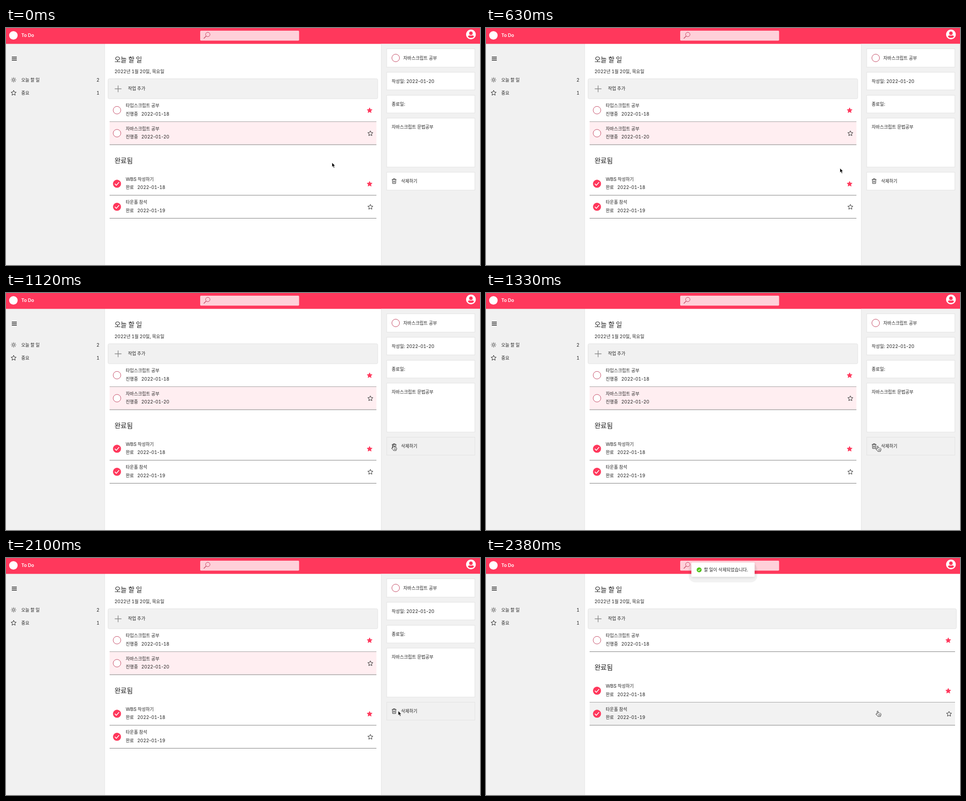
These frames come from a looping animation (1057x530 px, 3710 ms). An HTML page:

```html
<!DOCTYPE html>
<html lang="ko">
<head>
<meta charset="utf-8">
<title>To Do</title>
<style>
html, body { margin: 0; width: 100%; height: 100%; overflow: hidden; background: #fff; }
svg { display: block; width: 1057px; height: 530px; }
text {
  font-family: Inter, "Noto Sans CJK KR", "Noto Sans CJK", sans-serif;
  word-spacing: -.05em;
  fill: #222;
  white-space: pre;
}
.digits { font-variant-numeric: tabular-nums; }
</style>
</head>
<body>
<svg id="stage" viewBox="0 0 1057 530"></svg>
<script>
const PINK = '#ff385c', GREY = '#f1f1f1', EDGE = '#e2e2e2', RED = '#c23f5c';
const LOOP = 3710, STEP = 70;

// Hangul and digits are set slightly smaller than Latin; y is the middle of the line
const text = (x, y, str, size = 10.5, attrs = '') =>
  `<text x="${x}" y="${y + size * .36}" font-size="${size}" ${attrs}>` +
  str.replace(/([가-힣]+)|\d+/g, (run, hangul) => hangul
    ? `<tspan font-size="${size * .94}">${run}</tspan>`
    : `<tspan font-size="${size * .97}" class="digits">${run}</tspan>`) + '</text>';

const heading = (x, y, str) => text(x, y, str, 15.75, 'font-weight="500"');

const rect = (x, y, w, h, fill, attrs = '') =>
  `<rect x="${x}" y="${y}" width="${w}" height="${h}" fill="${fill}" ${attrs}/>`;

const circle = (x, y, r, fill, stroke = 'none') =>
  `<circle cx="${x}" cy="${y}" r="${r}" fill="${fill}" stroke="${stroke}"/>`;

const line = (d, stroke, width = 1) =>
  `<path d="${d}" fill="none" stroke="${stroke}" stroke-width="${width}"/>`;

function star(x, y, filled) {
  const points = Array.from({ length: 10 }, (_, i) => {
    const a = i * Math.PI / 5, r = i % 2 ? 2.8 : 6;
    return [x + r * Math.sin(a), y + .4 - r * Math.cos(a)].map(v => v.toFixed(2));
  });
  return `<polygon points="${points.join(' ')}" fill="${filled ? PINK : 'none'}"
    stroke="${filled ? PINK : '#222'}" stroke-linejoin="round"/>`;
}

const check = (x, y, s, width) =>
  line(`M${x - 5 * s} ${y}l${3.5 * s} ${3.7 * s} ${6.5 * s} ${-7.4 * s}`, '#fff', width);

const plus = (x, y) => line(`M${x - 7.5} ${y}h15M${x} ${y - 7.5}v15`, '#888', 1.4);

function sun(x, y) {
  let rays = '';
  for (let i = 0; i < 8; i++) {
    const c = Math.cos(i * Math.PI / 4), s = Math.sin(i * Math.PI / 4);
    rays += `M${x + 4.2 * c} ${y + 4.2 * s}L${x + 5.7 * c} ${y + 5.7 * s}`;
  }
  return circle(x, y, 2.5, 'none', '#222') + line(rays, '#222', 1.1);
}

const trash = (x, y) =>
  line(`M${x - 5} ${y - 3.5}h10M${x - 2} ${y - 3.5}v-1.6h4v1.6M${x - 3.8} ${y - 3.5}l.4 9h6.8l.4-9` +
       `M${x - 1.2} ${y - 1}v4.4M${x + 1.2} ${y - 1}v4.4`, '#222');

const avatar = (x, y) =>
  circle(x, y, 10.8, '#fff') + circle(x, y - 2.7, 3.9, PINK) +
  `<path d="M${x - 6.7} ${y + 5}q.5-2.9 3.5-2.9 3.2 1 6.4 0 3 0 3.5 2.9-2.5 2.9-6.7 2.9t-6.7-2.9z" fill="${PINK}"/>`;

function task(top, right, name, date, { done, starred, fill = 'none' }) {
  const mid = top + 25.6, bottom = top + 51.3;
  return rect(231, top, right - 231, 51.3, fill) +
    line(`M231 ${bottom}H${right}`, '#777') +
    (done ? circle(247.5, mid, 9, PINK) + check(247.5, mid, .95, 1.7)
          : circle(247.5, mid, 8.5, '#fff', RED)) +
    text(267, top + 15.1, name) +
    text(267, top + 33.6, done ? '완료' : '진행중') +
    text(done ? 292.7 : 301.7, top + 33.6, date) +
    star(right - (starred ? 15.2 : 13.5), mid + .2, starred);
}

function list(deleted) {
  const right = deleted ? 1046 : 826, shift = deleted ? -51.5 : 0;
  return text(208.3, 116, deleted ? '1' : '2', 10.5, 'text-anchor="end"') +
    rect(227.5, 113.5, right - 224.5, 44.7, GREY, `rx="3" stroke="${EDGE}"`) +
    plus(250, 136) + text(272, 135.5, '작업 추가') +
    task(158.2, right, '타입스크립트 공부', '2022-01-18', { starred: true }) +
    (deleted ? '' : task(209.7, right, '자바스크립트 공부', '2022-01-20', { fill: '#ffeef1' })) +
    heading(242, 296 + shift, '완료됨') +
    task(322.7 + shift, right, 'WBS 작성하기', '2022-01-18', { done: true, starred: true }) +
    task(374.2 + shift, right, '타운홀 참석', '2022-01-19',
      { done: true, fill: deleted ? '#f2f2f2' : 'none' });
}

const card = (y, h, attrs = '') => rect(849, y, 196.5, h, '#fff', `stroke="${EDGE}" ${attrs}`);

const frame =
  rect(0, 35, 220, 495, GREY) + line('M220 35V530', EDGE) +
  rect(0, 0, 1057, 35.5, PINK) +
  circle(16.5, 16.5, 9.5, '#fff') +
  text(34, 16.7, 'To Do', 10.5, 'style="fill:#fff;font-weight:600"') +
  rect(433, 6, 220.6, 22.3, '#ffd0d9', 'rx="2"') +
  circle(450, 14.5, 4.9, 'none', RED) + line('M446.5 18L441 23.5', RED, 1.2) +
  avatar(1036.8, 14.4) +
  line('M13 65h11M13 68.5h11M13 72h11', '#222', 1.4) +
  sun(17, 116) + text(34, 116, '오늘 할 일') +
  star(17, 145, false) + text(34, 145, '중요') +
  text(208.3, 145, '1', 10.5, 'text-anchor="end"') +
  heading(242, 70, '오늘 할 일') +
  text(242, 97, '2022년 1월 20일, 목요일');

const detail =
  rect(837, 35.5, 220, 494.5, GREY) + line('M837 35.5V530', EDGE) +
  card(46.5, 41) + circle(869, 67, 8.5, '#fff', RED) + text(886, 67, '자바스크립트 공부') +
  card(99, 39.5) + text(860, 119, '작성일: 2022-01-20') +
  card(150.5, 39.5) + text(860, 170, '종료일:') +
  card(201.5, 109.5) + text(860, 221, '자바스크립트 문법공부') +
  card(322.5, 40, 'id="remove"') + trash(865.5, 342.3) + text(881, 342, '삭제하기');

const toast =
  rect(452, 12, 153, 42.5, '#000', 'rx="14" opacity=".05"') +
  rect(458, 10, 141, 32, '#fff', 'rx="1.5" style="filter:drop-shadow(0 2px 3px rgba(0,0,0,.12))"') +
  circle(475.3, 26.5, 5.5, '#52c41a') + check(475.3, 26.7, .5, 1.1) +
  text(486, 26, '할 일이 삭제되었습니다.');

const $ = id => document.getElementById(id);
$('stage').innerHTML = `${frame}
  <g id="before">${list(false)}${detail}</g>
  <g id="after">${list(true)}</g>
  <g id="toast">${toast}</g>
  <g id="cursor" stroke-linejoin="round">
    <path id="arrow" d="M0 0V9.8L2.2 7.8 3.9 11.7 5.7 10.9 4 7.2H7Z" fill="#000" stroke="#fff" stroke-width=".7"/>
    <path id="hand" d="M-2.4 7.2V1.4q0-1.1 1.1-1.1T-.2 1.4V4.8q1.1-1 2 .1 1.1-.8 1.9.4 1.2-.5 1.8.5.7.4.7 1.2V8.4q0 1.6-1.2 3V12.4H-.8V11.6L-4.7 8.2q-1.1-1.6.2-1.9T-2.4 7.2Z
      M.6 7.8v2.4M2.2 7.8v2.4M3.8 7.8v2.4" fill="#fff" stroke="#111" stroke-width=".9"/>
  </g>`;

// Pointer path: time, x, y
const path = [[0, 727, 301], [350, 744, 301], [560, 776, 309.5],
              [910, 844.5, 331], [1120, 865, 340], [1330, 874.7, 342]];

function pointer(t) {
  const last = path.length - 1;
  if (t >= path[last][0]) return path[last].slice(1);
  const i = path.findIndex(p => p[0] > t) - 1, a = path[i], b = path[i + 1];
  const span = b[0] - a[0], u = (t - a[0]) / span;
  const slope = (k, axis) => k === 0 || k === last ? 0 :
    (path[k + 1][axis] - path[k - 1][axis]) / (path[k + 1][0] - path[k - 1][0]);
  return [1, 2].map(axis =>
    a[axis] + (b[axis] - a[axis]) * u * u * (3 - 2 * u) +
    span * u * (1 - u) * (slope(i, axis) * (1 - u) - slope(i + 1, axis) * u));
}

// cubic-bezier(.08, .82, .17, 1)
function easeOutCirc(x) {
  const bezier = (p, q, s) => 3 * (1 - s) ** 2 * s * p + 3 * (1 - s) * s * s * q + s ** 3;
  let lo = 0, hi = 1;
  for (let i = 0; i < 24; i++) {
    const mid = (lo + hi) / 2;
    if (bezier(.08, .17, mid) < x) lo = mid; else hi = mid;
  }
  return bezier(.82, 1, lo);
}

const show = (id, on) => $(id).setAttribute('visibility', on ? 'visible' : 'hidden');

function draw(now) {
  const t = Math.floor(now % LOOP / STEP) * STEP;
  const deleted = t >= 2170, [x, y] = pointer(t), hover = x > 849;
  const hand = hover && (t < 1820 || deleted);
  show('before', !deleted);
  show('after', deleted);
  show('hand', hand);
  show('arrow', !hand);
  $('remove').setAttribute('fill', hover ? GREY : '#fff');
  $('cursor').setAttribute('transform', `translate(${x} ${y})`);

  const p = deleted ? easeOutCirc(Math.min(1, (t - 2120) / 300)) : 0;
  $('toast').setAttribute('opacity', p);
  $('toast').setAttribute('transform', `translate(0 ${(p - 1) * 44})`);
}

const start = performance.now();
(function tick() {
  draw(performance.now() - start);
  requestAnimationFrame(tick);
})();
</script>
</body>
</html>
```
